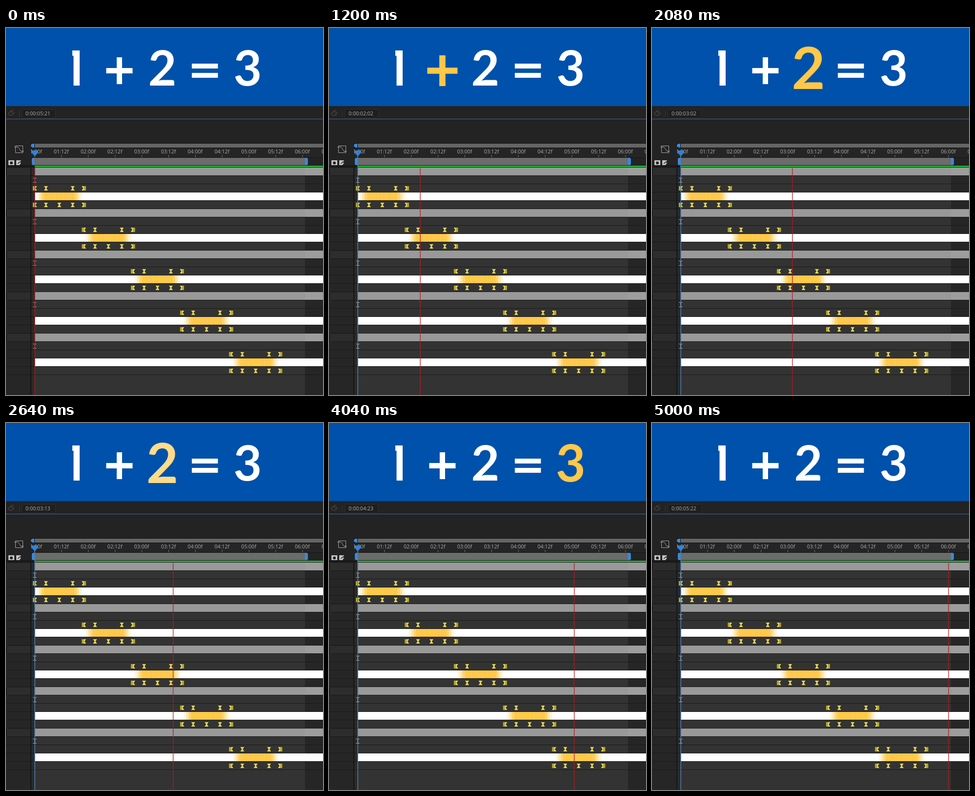
An HTML page for the animation above (5080 ms loop, 650 by 752 pixels).

```html
<!DOCTYPE html>
<html lang="en">
<head>
<meta charset="utf-8">
<title>Equation timeline</title>
<style>
  html, body { margin: 0; width: 100%; height: 100%; overflow: hidden; background: #232323; }
  svg { display: block; width: 650px; height: 752px; }
  .digit { font: 700 100px Lato, sans-serif; text-anchor: middle; }
  .small { font: 10.6px "Noto Sans", "Open Sans", sans-serif; fill: #a2a2a2; }
  .mid { text-anchor: middle; }
</style>
</head>
<body>
<svg viewBox="0 0 650 752" xmlns="http://www.w3.org/2000/svg">
  <rect width="650" height="160" fill="#0051ab"/>
  <g id="glyphs" fill="#fff">
    <path d="M136 46H151V118H138.5V57H136Z"/>
    <path d="M227 60H238V82H259.5V93H238V115H227V93H205.5V82H227Z"/>
    <text class="digit" x="320.5" y="118">2</text>
    <path d="M381 73H434.5V83H381ZM381 92H434.5V102H381Z"/>
    <text class="digit" x="495.5" y="118">3</text>
  </g>
  <g id="panel"></g>
  <g id="rows"></g>
  <g id="cursor"></g>
</svg>
<script>
const LOOP = 5080, TICK = 40, LAST = 125;
const X0 = 59, PX = 4.575, SPAN = 22;
const YELLOW = [255, 200, 72];

// Pivot of each glyph
const pivots = [[144.5, 82], [232.5, 87.5], [320.5, 81.8], [407.7, 87.5], [495.5, 82]];
// Keys as [frame, value] within one layer
const scaleKeys = [[0, 1], [5, 1.2], [11, 1], [17, 1.2], [22, 1]];
const tintKeys = [[0, 0], [5, 1], [17, 1], [22, 0]];
// Playhead as [tick, frame]
const headKeys = [[0, 0], [30, 28], [52, 50], [66, 62], [86, 82], [101, 97], [125, 120]];
// Frames at which the time display refreshes
const refresh = [3, 9, 15, 20, 26, 32, 38, 44, 50, 55, 61, 67, 72, 78, 84, 89, 95, 101, 107, 112, 118];

const $ = id => document.getElementById(id);
const panel = $('panel'), rows = $('rows'), cursor = $('cursor');
const smooth = p => p * p * (3 - 2 * p);

function sample(keys, f, ease = smooth) {
  if (f <= keys[0][0]) return keys[0][1];
  for (let k = 1; k < keys.length; k++) {
    const [a, u] = keys[k - 1], [b, v] = keys[k];
    if (f <= b) return u + (v - u) * ease((f - a) / (b - a));
  }
  return keys[keys.length - 1][1];
}

function tint(f) {
  const p = sample(tintKeys, f);
  return `rgb(${YELLOW.map(c => Math.round(255 + (c - 255) * p))})`;
}

function add(parent, tag, attrs, text) {
  const el = document.createElementNS('http://www.w3.org/2000/svg', tag);
  for (const k in attrs) el.setAttribute(k, attrs[k]);
  if (text) el.textContent = text;
  parent.appendChild(el);
  return el;
}
const rect = (g, x, y, width, height, fill) => add(g, 'rect', { x, y, width, height, fill });
const path = (g, d, fill, more) => add(g, 'path', { d, fill, ...more });

function drawPanel() {
  rect(panel, 0, 160, 650, 592, '#232323');
  rect(panel, 0, 186, 650, 1, '#4069a0');

  path(panel, 'M4 176Q10 168 17 174Q11 183 4 176M8 171L15 168M12 175h2', 'none', { stroke: '#414141', 'stroke-width': 1.5 });
  rect(panel, 27, 169, 1, 12, '#363636');
  add(panel, 'rect', { x: 32.5, y: 166.5, width: 69, height: 18, rx: 1, fill: '#1f1f1f', stroke: '#303030' });

  path(panel, 'M19.5 241.5H34.5V255.5H19.5ZM17 244H22C30 244 25 253 36 253', 'none', { stroke: '#a9a9a9' });
  rect(panel, 5, 271, 12, 11, '#c4c4c4');
  add(panel, 'circle', { cx: 11, cy: 276.5, r: 3, fill: '#222' });
  path(panel, 'M21 271H31L28 276H31L27 282H21Z', '#c4c4c4');
  path(panel, 'M23 279L29 272L27 277Z', '#222');

  // Navigator, ruler and work area
  rect(panel, 51, 236, 599, 10, '#141414');
  rect(panel, 59, 237, 591, 8, '#656565');
  path(panel, 'M58 237H56Q51 237 51 241T56 245H58Z', '#3989df');
  rect(panel, 51, 246, 599, 20, '#252525');
  rect(panel, 51, 265, 599, 1, '#151515');
  for (let k = 0; k < 12; k++) {
    const x = X0 + k * 12 * PX, sec = 1 + (k >> 1);
    rect(panel, x - .5, 260, 1, 5, '#777');
    add(panel, 'text', { class: 'small mid', x: x - .5, y: 257 }, `0${sec}:${k % 2 ? 12 : '00'}f`);
  }
  rect(panel, 36, 246, 15, 15, '#232323');
  path(panel, 'M34.5 241.5V255.5M30 252Q32 253 36 253', 'none', { stroke: '#a9a9a9' });
  rect(panel, 58, 266, 555, 15, '#6c6c6c');
  path(panel, 'M58 266H56Q53 266 53 269V278Q53 281 56 281H58Z', '#3989df');
  path(panel, 'M613 266H616Q619 266 619 269V278Q619 281 616 281H613Z', '#3989df');
  rect(panel, 0, 281, 650, 5, '#191919');
  rect(panel, 59, 282, 591, 3, '#23b437');
  path(panel, 'M53 251H65V256L59 263L53 256Z', '#2f83dc');
}

function drawKey(x, y, kind) {
  const shape = {
    start: 'M-4-4.5H4.5L1.5 0L4.5 4.5H-4Z',
    mid: 'M-4-4.5H4L1 0L4 4.5H-4L-1 0Z',
    end: 'M4-4.5H-4.5L-1.5 0L-4.5 4.5H4Z'
  }[kind];
  const g = add(rows, 'g', { transform: `translate(${x} ${y})` });
  path(g, shape, '#e6d75a');
  if (kind !== 'mid') rect(g, kind === 'start' ? -4 : 0, -4.5, 4, 9, '#b3a52b');
}

function drawLayer(n) {
  const y = 286 + n * 85, start = n * SPAN;
  const xAt = f => X0 + (start + f) * PX;
  rect(rows, 0, y + 1, 50, 15, '#2d2d2d');
  rect(rows, 0, y + 2, 1.5, 13, '#151515');
  rect(rows, 59, y, 554, 16, '#999');
  rect(rows, 613, y, 37, 16, '#9d9d9d');
  rect(rows, 59, y + 51, 591, 16, '#fff');
  for (let f = 0; f < SPAN; f++) rect(rows, xAt(f), y + 51, PX + .3, 16, tint(f + .5));
  for (let r = 0; r < 5; r++) rect(rows, 0, y + 16 + r * 17, 650, 1, '#191919');
  for (const [keys, dy] of [[tintKeys, 42.5], [scaleKeys, 76.5]])
    keys.forEach(([f], k) => drawKey(xAt(f), y + dy, k === 0 ? 'start' : f === SPAN ? 'end' : 'mid'));
}

function drawRows() {
  rect(rows, 0, 286, 50, 466, '#262626');
  rect(rows, 52, 286, 7, 466, '#2a2a2a');
  rect(rows, 59, 286, 554, 466, '#333');
  rect(rows, 613, 286, 37, 466, '#262626');
  for (let n = 0; n < 5; n++) drawLayer(n);
  rect(rows, 50, 286, 2, 466, '#151515');
}

drawPanel();
drawRows();

const clock = add(panel, 'text', { class: 'small', x: 40, y: 179 });
const inPoint = rect(cursor, 58.3, 262, 1.5, 490, '#4a7fb5');
const beams = [0, 1, 2, 3, 4].map(n =>
  path(cursor, `M55.5 ${307.5 + n * 85}H58L59 ${308.5 + n * 85}L60 ${307.5 + n * 85}H62.5M59 ${308 + n * 85}v8M55.5 ${316.5 + n * 85}H58L59 ${315.5 + n * 85}L60 ${316.5 + n * 85}H62.5`,
    'none'));
const head = rect(cursor, 0, 287, 1.6, 465, '#ad1d22');
head.setAttribute('opacity', .8);
const glyphs = [...$('glyphs').children];

function timecode(f) {
  const two = n => String(n).padStart(2, '0');
  return `0:00:${two(1 + Math.floor(f / 24))}:${two(f % 24)}`;
}

function render(ms) {
  const tick = Math.min(LAST, Math.floor(ms / TICK));
  const frame = tick - Math.floor((tick + 15) / 25);
  glyphs.forEach((el, n) => {
    const f = frame - n * SPAN, [x, y] = pivots[n];
    el.setAttribute('transform', `translate(${x} ${y}) scale(${sample(scaleKeys, f)}) translate(${-x} ${-y})`);
    el.setAttribute('fill', tint(f));
  });

  const pos = Math.round(sample(headKeys, tick, p => p));
  head.setAttribute('x', X0 - .7 + pos * PX);
  inPoint.setAttribute('visibility', pos ? 'visible' : 'hidden');
  beams.forEach(b => b.setAttribute('stroke', pos ? '#9db4c6' : '#cf9a9a'));
  const shown = refresh.filter(f => f <= pos).pop() ?? 117;
  clock.textContent = timecode(shown);
}

const begin = performance.now();
function loop() {
  render((performance.now() - begin) % LOOP);
  requestAnimationFrame(loop);
}
loop();
</script>
</body>
</html>
```
